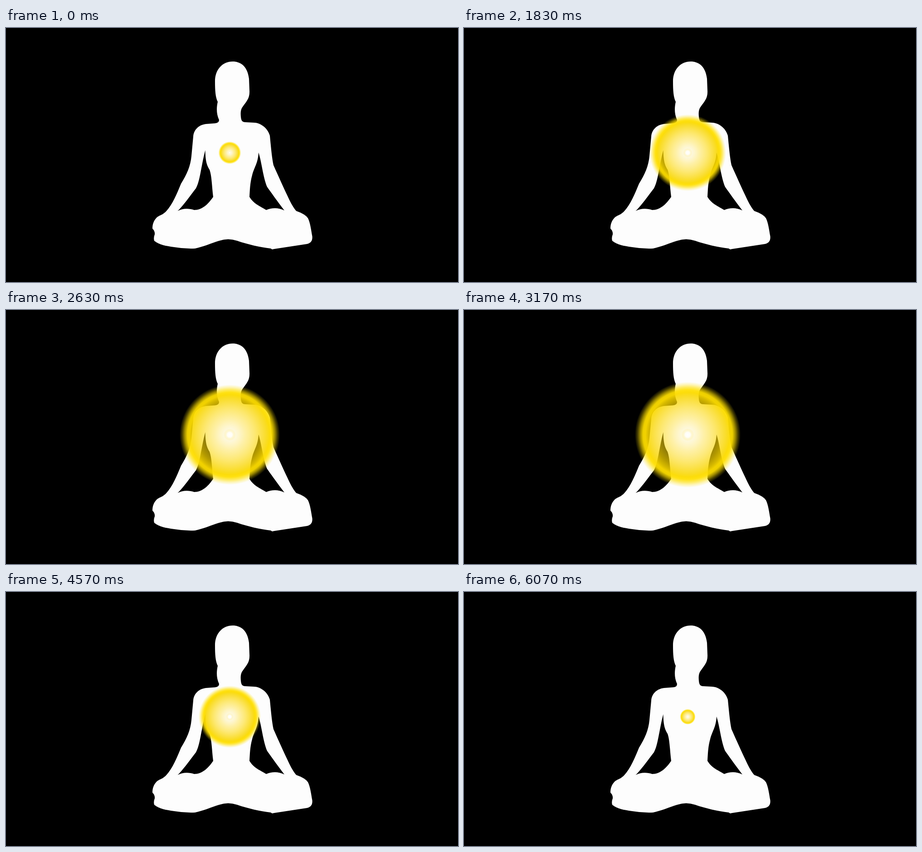
Write an HTML page that moves like this. It is 997 px wide and 561 px high and loops after 6.11 s.

```html
<!DOCTYPE html>
<html lang="en">
<head>
<meta charset="utf-8">
<title>Meditation glow</title>
<style>
  html, body { margin: 0; width: 100%; height: 100%; overflow: hidden; background: #000; }
  svg { display: block; width: 100vw; height: 100vh; }
</style>
</head>
<body>
<svg viewBox="0 0 997 561">
  <defs>
    <radialGradient id="gold">
      <stop offset="0" stop-color="#fff"/>
      <stop offset=".05" stop-color="#fffdf4" stop-opacity=".9"/>
      <stop offset=".12" stop-color="#ffe560" stop-opacity=".22"/>
      <stop offset=".3" stop-color="#ffdc20" stop-opacity=".38"/>
      <stop offset=".5" stop-color="#fdd90c" stop-opacity=".57"/>
      <stop offset=".64" stop-color="#fad600" stop-opacity=".72"/>
      <stop offset=".74" stop-color="#f9d700" stop-opacity=".86"/>
      <stop offset=".8" stop-color="#fcdb00" stop-opacity=".96"/>
      <stop offset=".845" stop-color="#ffdf00" stop-opacity=".93"/>
      <stop offset=".9" stop-color="#ffdf00" stop-opacity=".62"/>
      <stop offset=".95" stop-color="#ffdf00" stop-opacity=".27"/>
      <stop offset="1" stop-color="#ffdf00" stop-opacity="0"/>
    </radialGradient>
    <filter id="soft" color-interpolation-filters="sRGB">
      <feGaussianBlur stdDeviation=".6"/>
    </filter>
  </defs>
  <rect width="997" height="561"/>
  <path fill="#fdfdfd" fill-rule="evenodd" filter="url(#soft)" d="
    M500 74 C478 74 461 91 461 118 C461 138 462 153 467 163
    C464 177 464 190 470 203 Q470 210 461 210.500 L441 212
    C425 214 414 225 413 240 L409 283 C407 305 399 323 386 344
    C377 366 367 390 354 404 C347 412 340 413 333 418
    C326 425 323 433 323 443 Q329 449 328 456 Q325 463 327 470
    C338 479 351 481 371 484 Q394 488 417 487
    C436 483 453 475 470 470 Q490 463 510 470
    C533 478 560 484 584 487 L587 489 L592 488 L664 477
    Q677 474 675.500 460 C673 446 671 430 666 420 Q660 411 640 404
    C632 394 627 384 621 371 C612 352 602 330 590 303
    C586 284 584 258 582 238 C578 222 562 209 546 209 L527 208
    Q520 208 518.500 200 C517 190 517 180 522 174
    C531 161 538 155 537 138 L536 112 C533 87 520 74 500 74 Z
    M439.500 270 C440 295 443 303 449 313 C454 327 454 350 457 373
    C446 389 433 402 415 402 C404 398 389 398 379 404
    C395 387 406 371 419 354 C428 338 430 307 439.500 270 Z
    M557 275 C556 299 547 308 543 325 C538 343 538 358 537 373
    C546 388 559 393 574 402 C586 397 600 396 614 403
    C598 382 586 365 576 351 C567 330 564 296 557 275 Z"/>
  <circle id="glow" cx="493.500" cy="275.500" fill="url(#gold)"/>
</svg>
<script>
  const LOOP = 6110, STEP = 100 / 3, LAST = 182;
  const glow = document.getElementById("glow");

  // Steady growth, then a slightly quicker shrink; the loop restarts with a jump.
  const radius = t => Math.min(25 + 0.0325 * t, 96 + 0.0343 * (3770 - t));

  function draw(now) {
    const step = Math.min(LAST, Math.floor((now % LOOP + 5) / STEP));
    glow.setAttribute("r", radius(step * STEP).toFixed(2));
  }

  const start = performance.now();
  function tick() {
    draw(performance.now() - start);
    requestAnimationFrame(tick);
  }
  tick();
</script>
</body>
</html>
```
